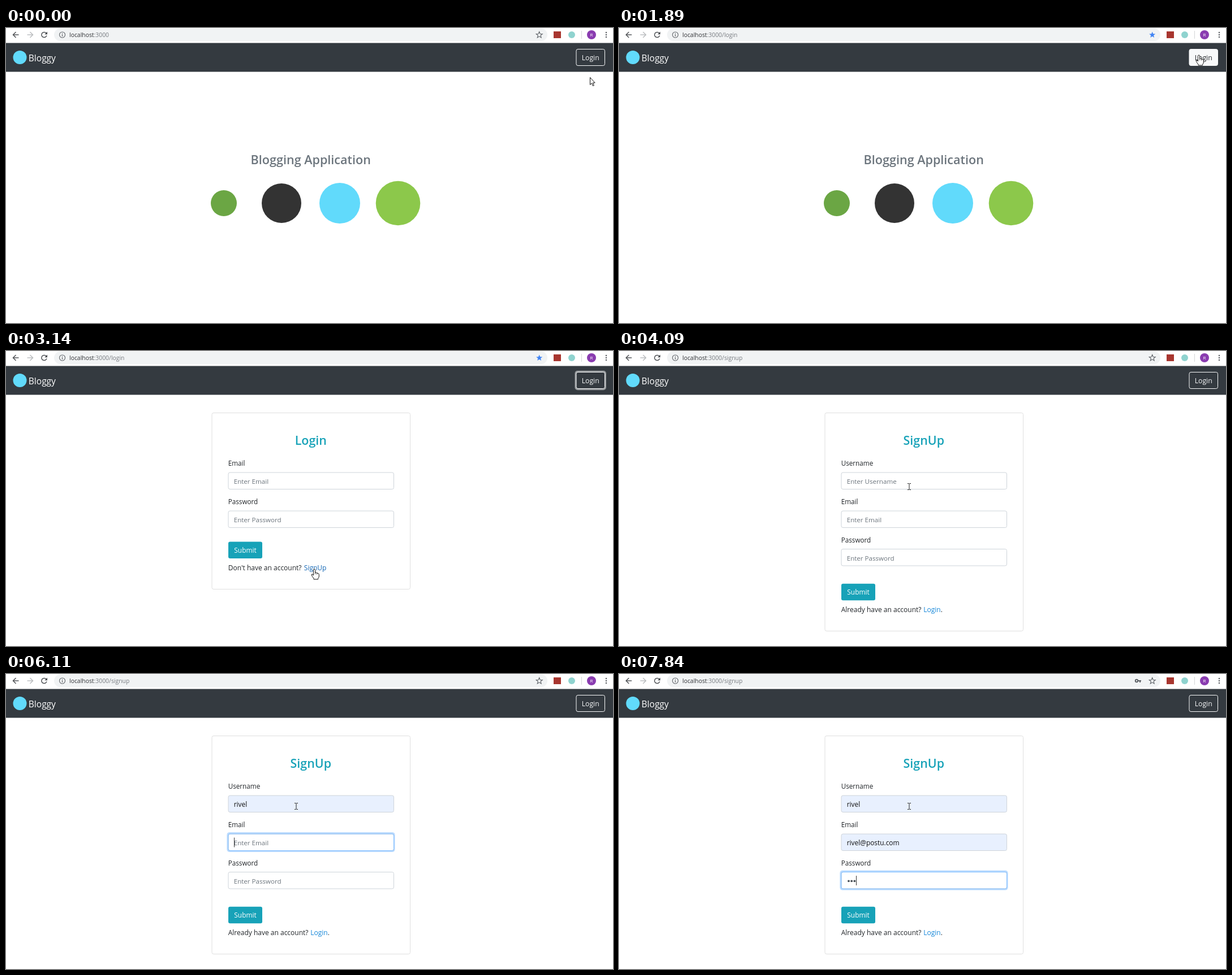
Animation of 1073 by 522 pixels, one loop 8000 ms. Source, as an HTML page with a canvas:

```html
<!DOCTYPE html>
<html lang="en">
<head>
<meta charset="utf-8">
<title>Bloggy</title>
<style>
html, body { margin: 0; width: 100%; height: 100%; overflow: hidden; background: #fff; }
canvas { display: block; }
</style>
</head>
<body>
<canvas id="stage" width="1073" height="522"></canvas>
<script>
const ctx = document.getElementById('stage').getContext('2d');
const LOOP = 8000;
const FONT = '"Open Sans", "Noto Sans", sans-serif';
const USER = 'rivel', MAIL = 'rivel@postu.com';
const INFO = '#17a2b8', INK = '#212529', MUTED = '#6c757d', ICON = '#5f6368';

// start, end, steps, x, y of the pointer's hot spot
const MOVES = [
  [1040, 1110, 2, 1032, 80],
  [1470, 1680, 4, 1025, 48],
  [2260, 2670, 6, 629, 347],
  [2820, 3140, 5, 545, 386],
  [3760, 4090, 5, 513, 240],
  [4250, 4320, 2, 513, 234]
];
const ARROW = new Path2D('M.5.5V13.4L3.4 10.7L5.4 15.4L7.4 14.6L5.4 10H9.2Z');
const HAND = new Path2D('M-1.6 11V1.6Q-1.6 0 0 0T1.6 1.6V6Q4 5.2 4.6 7Q6.4 6.4 6.8 8Q8.3 7.6 8.3 9.6V13Q8 15 6.6 16.4V18H-1V16.4Q-4.6 12 -5 9.8Q-4.6 8 -2.8 9.4Z');

const clamp = v => Math.max(0, Math.min(1, v));
const ramp = (t, start, dur = 150) => clamp((t - start) / dur);
const pulse = (t, on, off) => ramp(t, on) - ramp(t, off);
const smooth = p => p * p * (3 - 2 * p);
const within = (t, a, b) => t >= a && t < b;

function text(str, x, y, size, color, opt = {}) {
  ctx.font = `${opt.weight || 400} ${size}px ${FONT}`;
  ctx.textAlign = opt.align || 'left';
  ctx.fillStyle = color;
  ctx.fillText(str, x, y);
  return ctx.measureText(str).width;
}

function box(x, y, w, h, r, fill, stroke) {
  ctx.beginPath();
  ctx.roundRect(x, y, w, h, r);
  if (fill) { ctx.fillStyle = fill; ctx.fill(); }
  if (stroke) { ctx.strokeStyle = stroke; ctx.lineWidth = 1; ctx.stroke(); }
}

function disc(x, y, r, color) {
  ctx.beginPath();
  ctx.arc(x, y, r, 0, 7);
  ctx.fillStyle = color;
  ctx.fill();
}

function ring(x, y, r, color, width) {
  ctx.beginPath();
  ctx.arc(x, y, r, 0, 7);
  ctx.strokeStyle = color;
  ctx.lineWidth = width;
  ctx.stroke();
}

function line(points, color, width) {
  ctx.beginPath();
  points.forEach(p => ctx.lineTo(p[0], p[1]));
  ctx.strokeStyle = color;
  ctx.lineWidth = width;
  ctx.stroke();
}

function star(x, y, filled) {
  ctx.beginPath();
  for (let i = 0; i < 10; i++) {
    const a = i * Math.PI / 5 - Math.PI / 2, r = i % 2 ? 2.5 : 5.8;
    ctx.lineTo(x + r * Math.cos(a), y + r * Math.sin(a));
  }
  ctx.closePath();
  if (filled) {
    ctx.fillStyle = '#4285f4';
    ctx.fill();
  } else {
    ctx.strokeStyle = ICON;
    ctx.lineWidth = 1.1;
    ctx.stroke();
  }
}

function toolbar(t) {
  const arrow = (x, dir, color) => {
    line([[x - 5 * dir, 12], [x + 5 * dir, 12]], color, 1.4);
    line([[x, 7], [x - 5 * dir, 12], [x, 17]], color, 1.4);
  };
  arrow(17.5, 1, '#4a4d51');
  arrow(42.5, -1, '#b8babd');

  ctx.beginPath();
  ctx.arc(67.5, 12, 4.6, 0.3, 5.5);
  ctx.strokeStyle = '#4a4d51';
  ctx.lineWidth = 1.5;
  ctx.stroke();
  ctx.beginPath();
  ctx.moveTo(73, 6.5);
  ctx.lineTo(73, 11.2);
  ctx.lineTo(68.3, 11.2);
  ctx.fillStyle = '#4a4d51';
  ctx.fill();

  box(85, 1, 872, 22, 11, '#f1f3f4');
  ring(99.5, 12, 5, ICON, 1.1);
  ctx.fillStyle = ICON;
  ctx.fillRect(98.9, 11.2, 1.2, 3.6);
  ctx.fillRect(98.9, 9, 1.2, 1.3);

  const path = t < 1890 ? '' : t < 3310 ? '/login' : '/signup';
  const w = text('localhost', 112, 16, 10.4, '#303236');
  text(':3000' + path, 112 + w, 16, 10.4, '#777b80');

  if (t >= 7690) {
    ring(915, 12, 2.2, ICON, 2);
    ctx.fillStyle = ICON;
    ctx.fillRect(917, 11, 6, 2);
    ctx.fillRect(920, 12, 2, 3);
  }
  star(942.7, 12.3, within(t, 1890, 3310));
  box(968, 6, 13, 12, 0, '#a8362f');
  disc(1000, 12, 6, '#8fd3cf');
  ctx.fillStyle = '#d3d5d8';
  ctx.fillRect(1017, 5, 1, 14);
  disc(1035, 12, 8, '#8a3cb0');
  text('R', 1035, 15, 8, '#fff', { align: 'center' });
  for (let y = 8; y < 18; y += 4) disc(1061, y, 1.3, ICON);
}

function navbar(t) {
  ctx.fillStyle = '#343a40';
  ctx.fillRect(0, 26.5, 1073, 51);
  disc(24.5, 52, 12, '#61dafb');
  text('Bloggy', 39.8, 58.5, 15.5, '#fff');

  const hover = pulse(t, 1540, 2260), focus = pulse(t, 1900, 3380);
  if (focus > 0) {
    ctx.globalAlpha = focus;
    box(1005.5, 34.7, 55.5, 34.6, 5, 'rgba(248,249,250,.5)');
    ctx.globalAlpha = 1;
    box(1008, 37.5, 50.5, 29, 3, '#343a40');
  }
  box(1008, 37.5, 50.5, 29, 3, `rgba(248,249,250,${hover})`, '#f8f9fa');
  const mix = (a, b) => Math.round(a + (b - a) * hover);
  text('Login', 1033.2, 56.7, 12.2, `rgb(${mix(248, 33)},${mix(249, 37)},${mix(250, 41)})`, { align: 'center' });
}

function home() {
  text('Blogging Application', 538.7, 241, 21.55, MUTED, { weight: 600, align: 'center' });
  disc(385, 310, 23, '#6ba644');
  disc(487, 310, 35, '#333');
  disc(590, 310, 36, '#61dafb');
  disc(693, 310, 39.3, '#8cc84b');
}

// f: label, hint, value, preview, filled, focus, caret, dots
function field(y, f) {
  text(f.label, 392.7, y - 11.2, 11.7, INK);
  const focus = f.focus || 0;
  if (focus > 0) box(390.4, y - 2.6, 297.2, 35.2, 5, `rgba(0,123,255,${0.27 * focus})`);
  box(393, y + 0.5, 292.5, 29.5, 3, f.filled ? '#e8f0fe' : '#fff', '#ced4da');
  if (focus > 0) {
    ctx.globalAlpha = focus;
    box(393, y + 0.5, 292.5, 29.5, 3, null, '#80bdff');
    ctx.globalAlpha = 1;
  }
  let w = 0;
  if (f.dots) {
    for (let i = 0; i < f.dots; i++) disc(406 + 5.2 * i, y + 16.3, 1.9, '#495057');
    w = 5.3 * f.dots;
  } else if (f.value) {
    w = text(f.value, 402.7, y + 20.5, f.preview ? 10 : 11.9, f.filled ? '#111' : '#495057');
  } else {
    text(f.hint, 402.7, y + 20.5, 11.6, MUTED);
  }
  if (f.caret) {
    ctx.fillStyle = '#333';
    ctx.fillRect(Math.round(403 + w), y + 7, 1, 17);
  }
}

function dropdown(y, str, active) {
  ctx.save();
  ctx.shadowColor = 'rgba(0,0,0,.35)';
  ctx.shadowBlur = 3;
  ctx.shadowOffsetY = 1;
  box(392, y, 294, 40.5, [0, 0, 2, 2], '#fff');
  ctx.restore();
  if (active) {
    ctx.fillStyle = '#e8eaed';
    ctx.fillRect(392, y + 6, 294, 28.5);
  }
  text(str, 401.7, y + 23.6, 10, '#111');
}

function card(bottom, title) {
  box(364, 109.5, 350.5, bottom - 109.5, 3, '#fff', '#dfdfdf');
  text(title, 538.8, 166, 21.4, INFO, { weight: 600, align: 'center' });
}

function footer(y, question, link, x, color) {
  box(393, y, 60, 29.5, 3, INFO);
  text('Submit', 423, y + 19.7, 11.9, '#fff', { align: 'center' });
  text(question, 392.7, y + 50.5, 12, INK);
  return x + text(link, x, y + 50.5, 12, color);
}

function login(t) {
  card(421.5, 'Login');
  field(214.5, { label: 'Email', hint: 'Enter Email' });
  field(282.5, { label: 'Password', hint: 'Enter Password' });
  footer(337.5, "Don't have an account?", 'SignUp', 526.8, t >= 3060 ? '#1467b5' : '#1687d9');
}

function signup(t) {
  card(495.5, 'SignUp');
  const dots = t < 7690 ? 0 : t < 7770 ? 1 : t < 7840 ? 2 : 3;
  field(214.5, {
    label: 'Username', hint: 'Enter Username',
    value: t >= 5800 ? USER : USER.slice(0, t < 5100 ? 0 : t < 5190 ? 1 : 2),
    preview: within(t, 5800, 5950), filled: t >= 5800,
    focus: pulse(t, 4500, 5960), caret: within(t, 4550, 5730)
  });
  field(282.5, {
    label: 'Email', hint: 'Enter Email',
    value: t >= 7050 ? MAIL : MAIL.slice(0, t < 6340 ? 0 : t < 6500 ? 1 : 2),
    preview: within(t, 7050, 7220), filled: t >= 7050,
    focus: pulse(t, 5960, 7300), caret: within(t, 6030, 7050)
  });
  field(350, {
    label: 'Password', hint: 'Enter Password', dots,
    focus: ramp(t, 7300), caret: t >= 7380
  });
  const end = footer(411.7, 'Already have an account?', 'Login', 538.2, '#1687d9');
  text('.', end, 462.2, 12, INK);
  if (within(t, 4720, 5950)) dropdown(246, USER, t >= 5800);
  if (within(t, 6420, 7220)) dropdown(313.8, MAIL, t >= 7050);
}

function pointerAt(t) {
  let x = 1032, y = 87;
  for (const [a, b, n, tx, ty] of MOVES) {
    if (t < a) break;
    const k = Math.min(n, 1 + Math.floor((t - a) / (b - a) * (n - 1) + 1e-6));
    const p = smooth(k / n);
    x += (tx - x) * p;
    y += (ty - y) * p;
  }
  return [x, y];
}

function pointer(t, page) {
  const [x, y] = pointerAt(t).map(Math.round);
  const tops = page === login ? [214, 282] : page === signup ? [214, 282, 350] : [];
  const onButton = x > 1007 && y > 37 && y < 67;
  const onLink = page === login && x > 526 && x < 567 && y > 376 && y < 392;
  const onField = x > 393 && x < 686 && tops.some(top => y >= top && y <= top + 31);
  ctx.save();
  ctx.translate(x, y);
  if (onField) {
    ctx.fillStyle = '#222';
    ctx.fillRect(-0.5, -5, 1, 10);
    for (const edge of [-6, 5]) {
      ctx.fillRect(-3, edge, 2.5, 1);
      ctx.fillRect(0.5, edge, 2.5, 1);
    }
  } else {
    const shape = onButton || onLink ? HAND : ARROW;
    ctx.fillStyle = '#fff';
    ctx.strokeStyle = '#111';
    ctx.lineWidth = 1;
    ctx.fill(shape);
    ctx.stroke(shape);
    if (shape === HAND) {
      line([[1.6, 6], [1.6, 9]], '#111', 0.8);
      line([[4.6, 7], [4.6, 9.5]], '#111', 0.8);
    }
  }
  ctx.restore();
}

function draw(t) {
  ctx.fillStyle = '#fff';
  ctx.fillRect(0, 0, 1073, 522);
  toolbar(t);
  navbar(t);
  const page = t < 1960 ? home : t < 3380 ? login : signup;
  page(t);
  pointer(t, page);
}

const begin = performance.now();
function frame() {
  draw((performance.now() - begin) % LOOP);
  requestAnimationFrame(frame);
}
frame();
</script>
</body>
</html>
```
